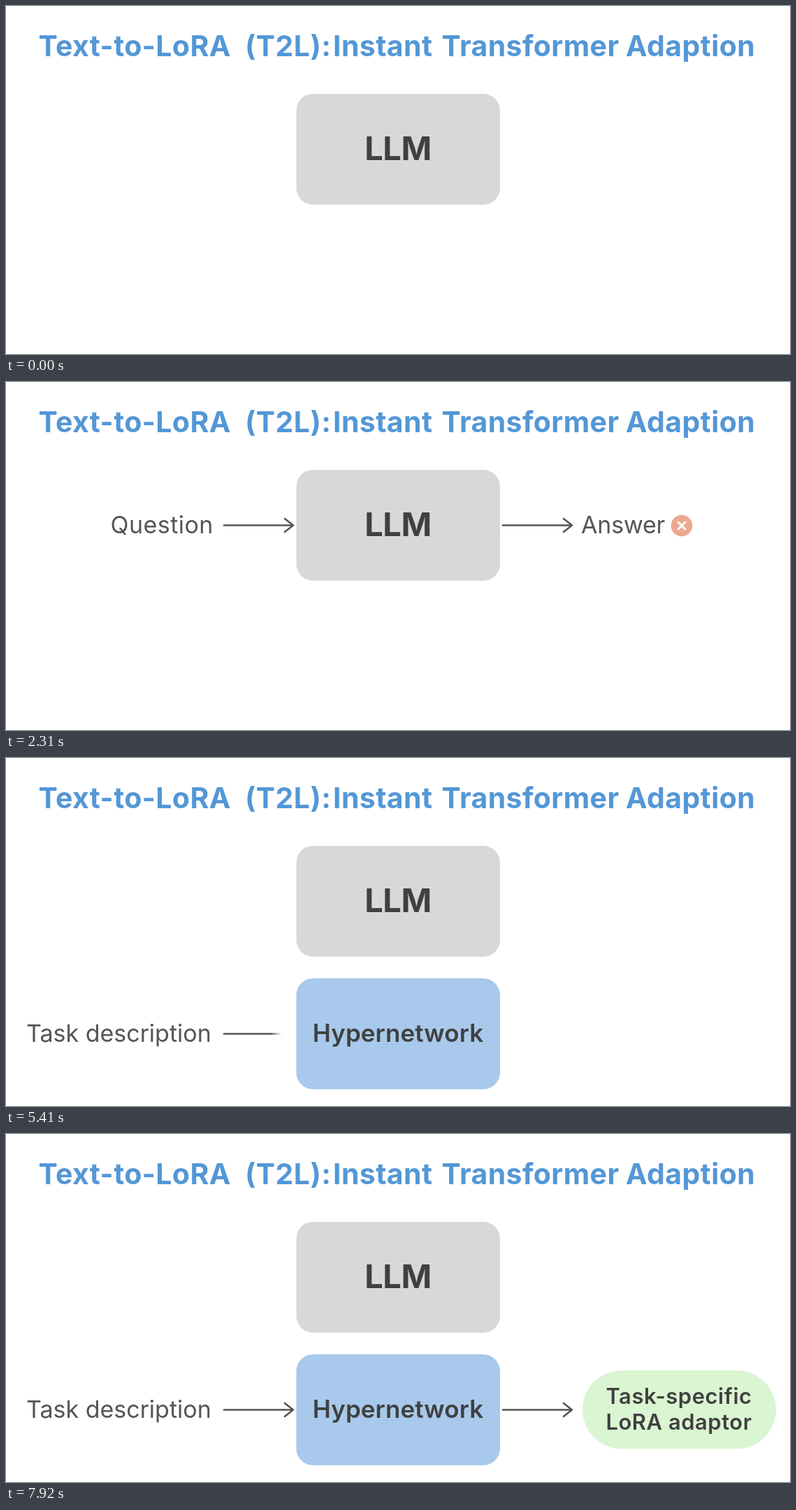
An HTML page that plays this animation: 1122 px wide and 499 px high, repeating every 8 s.

```html
<!DOCTYPE html>
<html lang="en">
<head>
<meta charset="utf-8">
<style>
  html, body { margin: 0; width: 100%; height: 100%; overflow: hidden; background: #fff; }
  svg { position: absolute; left: 0; top: 0; width: 1122px; height: 499px; }
  text { font: 34px Inter, sans-serif; fill: #555; }
  .bold { font-weight: 600; fill: #404040; text-anchor: middle; }
  .title { font-size: 41px; font-weight: 700; letter-spacing: .4px; fill: #5397d6; }
  .llm { font-size: 47px; font-weight: 700; letter-spacing: -.4px; }
  .hyper { font-size: 35px; letter-spacing: .1px; }
  .pill { font-size: 31px; letter-spacing: .5px; }
  .arrow { fill: none; stroke: #555; stroke-width: 2.6; stroke-linecap: round; stroke-linejoin: round; }
</style>
</head>
<body>
<svg>
  <text class="title" y="71.5">
    <tspan x="46.500">Text-to-LoRA</tspan>
    <tspan x="342">(T2L):</tspan>
    <tspan x="468">Instant</tspan>
    <tspan x="623.500">Transformer</tspan>
    <tspan x="887">Adaption</tspan>
  </text>
  <rect x="415.5" y="126" width="291.5" height="159" rx="24" fill="#d8d8d8"/>
  <text class="bold llm" x="561" y="220.500">LLM</text>
</svg>
<svg id="question"><text x="149.500" y="216.500" letter-spacing=".45">Question</text></svg>
<svg id="arrowIn"><path class="arrow" d="M312 205.500H411M399 196L411 205.500L399 215"/></svg>
<svg id="arrowOut"><path class="arrow" d="M711 205.500H810M798 196L810 205.500L798 215"/></svg>
<svg id="answer"><text x="823" y="216.500" letter-spacing="-.2">Answer</text></svg>
<svg id="wrong">
  <circle cx="967" cy="206" r="15.3" fill="#eda58a"/>
  <path d="M962 201l10 10m0-10l-10 10" stroke="#fff" stroke-width="3" stroke-linecap="round"/>
</svg>
<svg id="hyper">
  <rect x="415.5" y="316" width="291.5" height="159" rx="24" fill="#a8c9eb"/>
  <text class="bold hyper" x="561" y="406.500">Hypernetwork</text>
</svg>
<svg id="task"><text x="29" y="406.500">Task description</text></svg>
<svg id="taskIn"><path class="arrow" d="M312 395.500H411M399 386L411 395.500L399 405"/></svg>
<svg id="taskOut"><path class="arrow" d="M711 395.500H810M798 386L810 395.500L798 405"/></svg>
<svg id="adaptor">
  <rect x="825" y="339" width="277" height="112.500" rx="56.250" fill="#daf5d2"/>
  <text class="bold pill" x="963" y="387">Task-specific</text>
  <text class="bold pill" x="963" y="424">LoRA adaptor</text>
</svg>
<script>
const LOOP = 8000, STEP = 500, SOFT = 0.15;
const layer = id => document.getElementById(id);
const progress = (t, start, length = STEP) => Math.min(1, Math.max(0, (t - start) / length));

// id, start time, left and right end of the sweep
const wipes = [
  ["question", 5, 150, 298],
  ["arrowIn", 518, 310, 413],
  ["arrowOut", 1036, 709, 812],
  ["answer", 1554, 824, 983],
  ["task", 4535, 29, 296],
  ["taskIn", 5054, 310, 413],
  ["taskOut", 5572, 709, 812],
  ["adaptor", 6085, 825, 1102],
];

function wipe(id, p, left, right) {
  const soft = (right - left) * SOFT;
  const edge = left + (right - left + soft) * p;
  const style = layer(id).style;
  style.visibility = p > 0 ? "visible" : "hidden";
  const mask = p < 1 ? `linear-gradient(90deg, #000 ${edge - soft}px, transparent ${edge}px)` : "none";
  style.webkitMaskImage = style.maskImage = mask;
}

function draw(now) {
  const t = now % LOOP;
  for (const [id, start, left, right] of wipes) wipe(id, progress(t, start), left, right);
  const swap = progress(t, 4005);
  for (const id of ["question", "arrowIn", "arrowOut", "answer"]) layer(id).style.opacity = 1 - swap;
  layer("wrong").style.opacity = progress(t, 2072, 250) * (1 - swap);
  layer("hyper").style.opacity = swap;
  requestAnimationFrame(draw);
}
draw(0);
</script>
</body>
</html>
```
